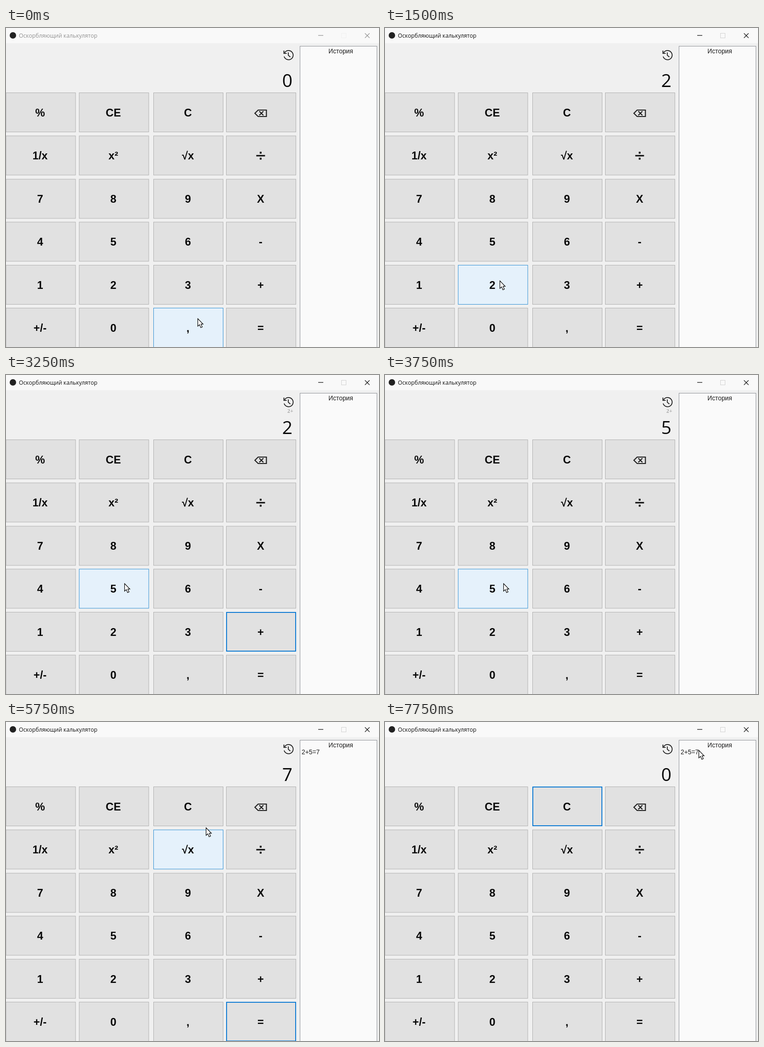
Write an HTML page that moves like this. It is 810 px wide and 692 px high and loops after 8 s.

```html
<!DOCTYPE html>
<html lang="ru">
<head>
<meta charset="utf-8">
<title>Калькулятор</title>
<style>
  html, body { margin: 0; width: 100%; height: 100%; overflow: hidden; background: #f0f0f0; }
  svg { display: block; width: 810px; height: 692px; }
  text { font-family: "Liberation Sans", Arial, sans-serif; fill: #080808; }
  .key { font-weight: bold; font-size: 23.7px; text-anchor: middle; }
  .small { font-size: 13.8px; fill: #1c1c1c; }
  .line { fill: none; stroke: #1d1d1d; }
</style>
</head>
<body>
<svg id="stage" viewBox="0 0 810 692">
  <rect width="810" height="692" fill="#f0f0f0"/>
  <rect width="810" height="33" fill="#f9f9f9"/>
  <circle cx="15" cy="16" r="7" fill="#222"/>
  <text id="title" x="28" y="20.5" style="font: 12.2px 'Open Sans', 'Noto Sans', sans-serif">Оскорбляющий калькулятор</text>
  <g id="controls" fill="none" stroke-width="1.2">
    <path d="M678 16.2H689M779.5 11.5L789.5 21.5M789.5 11.5L779.5 21.5"/>
  </g>
  <rect id="maximize" x="728.5" y="11.5" width="10" height="10" fill="none"/>

  <g class="line" stroke-width="1.8">
    <path d="M605 53.7A10 10 0 1 1 604 61.7"/>
    <path d="M603.5 49V55.2H609.5M613 53V59.2L617.5 63"/>
  </g>
  <text id="expr" x="617.5" y="81.5" text-anchor="middle" style="font: bold 12px 'Liberation Serif', serif; fill: #a6a6a6">2+</text>
  <text id="display" x="611" y="127.5" text-anchor="middle" style="font: 39px 'Open Sans', 'Noto Sans', sans-serif"></text>

  <rect x="638.5" y="39.5" width="167" height="660" fill="#fafafa" stroke="#8d9096"/>
  <text class="small" x="727" y="54.7" text-anchor="middle">История</text>
  <text class="small" id="record" x="642" y="70.4">2+5=7</text>

  <g id="keys"></g>
  <path id="cursor" d="M.5 .5V17L4.3 13.5L7 20L10.2 18.7L7.5 12.4H12Z" fill="#fff" stroke="#000" stroke-width="1.2"/>
</svg>
<script>
const LOOP = 8000, STEP = 250, KEY_W = 152, KEY_H = 86;
const $ = id => document.getElementById(id);
const cols = [-0.5, 158.5, 320, 478], rows = [140, 233.5, 327.5, 420.5, 514, 607];
const centers = [74, 233, 395, 553];
const labels = ['%', 'CE', 'C', '⌫', '1/x', 'x²', '√x', '÷', '7', '8', '9', 'X',
  '4', '5', '6', '-', '1', '2', '3', '+', '+/-', '0', ',', '='];

const colors = {
  idle: ['#e1e1e1', '#b0b0b0'],
  hover: ['#e5f1fb', '#2f8fd3'],
  press: ['#cce4f7', '#1f659f'],
  focus: ['#e1e1e1', '#0f7bd3']
};

// time, cursor x, cursor y
const moves = [
  [0, 416, 630], [250, 372, 628], [500, 262, 572], [750, 250, 550],
  [1250, 249, 548], [1750, 520, 551], [2250, 532, 549],
  [2750, 470, 525], [3000, 320, 470], [3250, 257, 452], [4000, 400, 560],
  [4250, 500, 687], [4500, 534, 655], [4750, 534, 653], [5000, 536, 651],
  [5750, 434, 229], [6000, 424, 186], [6500, 424, 185], [6750, 425, 183],
  [7250, 540, 118], [7500, 640, 78], [7750, 681, 61]
];

// time, focused key, pressed key, display, pending expression, history record
const states = [
  [0, '', '', '0', 0, 0], [1000, '2', '', '2', 0, 0],
  [2250, '+', '+', '2', 0, 0], [2500, '+', '', '2', 1, 0],
  [3500, '5', '5', '2', 1, 0], [3750, '5', '', '5', 1, 0],
  [4750, '=', '', '7', 0, 1], [6500, 'C', '', '0', 0, 1]
];

function add(parent, tag, attrs) {
  const node = document.createElementNS('http://www.w3.org/2000/svg', tag);
  for (const name in attrs) node.setAttribute(name, attrs[name]);
  return parent.appendChild(node);
}

function drawLabel(label, x, y) {
  const g = $('keys');
  if (label === '⌫') {
    add(g, 'path', { class: 'line', 'stroke-width': 2.2,
      d: `M${x - 12.5} ${y + 2}l7 -7h18v14h-18ZM${x - 3} ${y - 2.5}l9 9m0 -9l-9 9` });
  } else if (label === '÷') {
    add(g, 'path', { d: `M${x - 9.5} ${y - 1}h19v3h-19ZM${x - 2} ${y - 8}h4v4h-4ZM${x - 2} ${y + 5}h4v4h-4Z`, fill: '#080808' });
  } else {
    add(g, 'text', { class: 'key', x, y: y + 8.5 }).textContent = label;
  }
}

const keys = labels.map((label, i) => {
  const x = cols[i % 4], y = rows[i >> 2];
  const box = add($('keys'), 'rect', {});
  drawLabel(label, centers[i % 4], y + KEY_H / 2);
  return { label, x, y, box };
});

function paintKey(key, mode) {
  const [fill, stroke] = colors[mode], w = mode === 'focus' ? 2 : 1;
  const attrs = { x: key.x + w / 2, y: key.y + w / 2, width: KEY_W - w, height: KEY_H - w,
    fill, stroke, 'stroke-width': w };
  for (const name in attrs) key.box.setAttribute(name, attrs[name]);
}

const latest = (list, t) => list.filter(item => item[0] <= t).pop();
const show = (id, on) => $(id).setAttribute('visibility', on ? 'visible' : 'hidden');

function render(time) {
  const t = Math.floor(time % LOOP / STEP) * STEP;
  const [, cx, cy] = latest(moves, t);
  const [, focus, pressed, value, pending, recorded] = latest(states, t);
  const hx = cx + 2, hy = cy + 6;
  for (const key of keys) {
    const over = hx >= key.x && hx < key.x + KEY_W && hy >= key.y && hy < key.y + KEY_H + 2;
    paintKey(key, key.label === pressed ? 'press' : over ? 'hover' : key.label === focus ? 'focus' : 'idle');
  }
  const active = t >= 1000;
  $('title').style.fill = active ? '#111' : '#929292';
  $('controls').setAttribute('stroke', active ? '#111' : '#929292');
  $('maximize').setAttribute('stroke', active ? '#d2d2d2' : '#f0f0f0');
  $('display').textContent = value;
  show('expr', pending);
  show('record', recorded);
  $('cursor').setAttribute('transform', `translate(${cx} ${cy})`);
}

const start = performance.now();
function tick() {
  render(performance.now() - start);
  requestAnimationFrame(tick);
}
tick();
</script>
</body>
</html>
```
